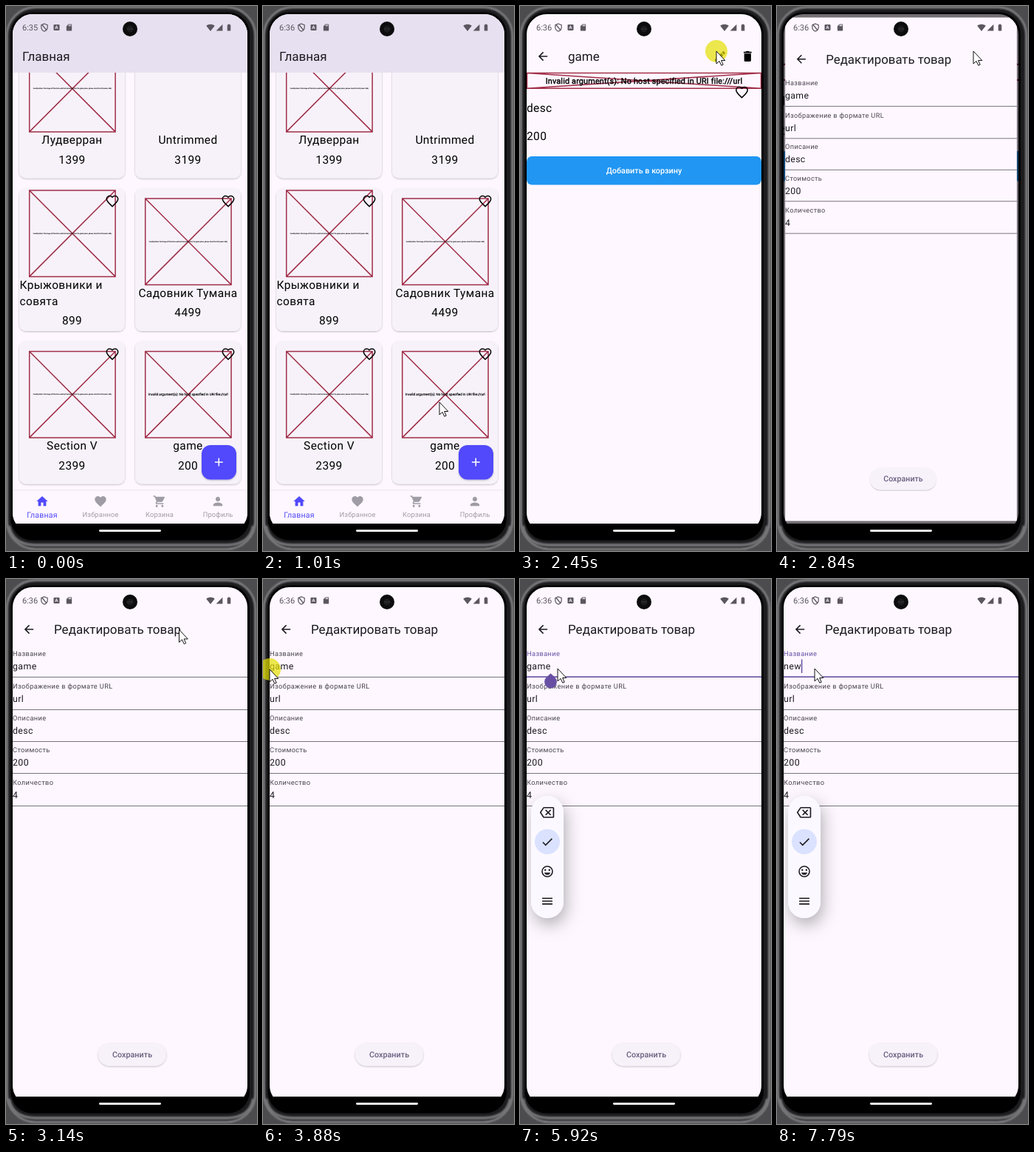
Animation, 340 px wide and 736 px high, one loop 8000 ms. Source, as an HTML page:

```html
<!DOCTYPE html>
<html lang="ru">
<head>
<meta charset="utf-8">
<title>Редактирование товара</title>
<style>
  html, body { margin: 0; width: 100%; height: 100%; overflow: hidden; background: #000; }
  svg { display: block; width: 100vw; height: 100vh; font-family: Roboto, sans-serif; text-rendering: geometricPrecision; }
</style>
</head>
<body>
<svg id="stage" viewBox="0 0 340 736"></svg>
<script>
const LOOP = 8000, STEP = 70;
const INK = '#1d1b20', PAGE = '#fef7ff', CARD = '#f7f2fa', ACCENT = '#6750a4';
const MUTED = '#a09ca5', BLUE = '#5149fb', STATUS = '#5b565f';

const ICON = {
  home: 'M10 20v-6h4v6h5v-8h3L12 3 2 12h3v8z',
  heart: 'M12 21.35l-1.45-1.32C5.4 15.36 2 12.28 2 8.5 2 5.42 4.42 3 7.5 3c1.74 0 3.41.81 4.5 2.09C13.09 3.81 14.76 3 16.5 3 19.58 3 22 5.42 22 8.5c0 3.78-3.4 6.86-8.55 11.54z',
  cart: 'M7 18c-1.1 0-2 .9-2 2s.9 2 2 2 2-.9 2-2-.9-2-2-2zM1 2v2h2l3.6 7.59-1.35 2.45C4.5 15.4 5.5 17 7 17h12v-2H7.42c-.14 0-.25-.11-.22-.37l.9-1.63h7.45c.75 0 1.41-.41 1.75-1.03l3.58-6.49A1 1 0 0 0 20 4H5.21l-.94-2zM17 18c-1.1 0-2 .9-2 2s.9 2 2 2 2-.9 2-2-.9-2-2-2z',
  person: 'M12 12c2.21 0 4-1.79 4-4s-1.79-4-4-4-4 1.79-4 4 1.79 4 4 4zm0 2c-2.67 0-8 1.34-8 4v2h16v-2c0-2.66-5.33-4-8-4z',
  edit: 'M3 17.25V21h3.75L17.81 9.94l-3.75-3.75zM20.71 7.04c.39-.39.39-1.02 0-1.41l-2.34-2.34c-.39-.39-1.02-.39-1.41 0l-1.83 1.83 3.75 3.75z',
  trash: 'M6 19c0 1.1.9 2 2 2h8c1.1 0 2-.9 2-2V7H6zM19 4h-3.5l-1-1h-5l-1 1H5v2h14z',
  back: 'M20 11H7.83l5.59-5.59L12 4l-8 8 8 8 1.41-1.41L7.83 13H20z',
  erase: 'M22 3H7c-.69 0-1.23.35-1.59.88L0 12l5.41 8.11c.36.53.9.89 1.59.89h15c1.1 0 2-.9 2-2V5c0-1.1-.9-2-2-2zm0 16H7.07L2.4 12l4.66-7H22zm-11.59-2L14 13.41 17.59 17 19 15.59 15.41 12 19 8.41 17.59 7 14 10.59 10.41 7 9 8.41 12.59 12 9 15.59z',
  check: 'M9 16.17L4.83 12l-1.42 1.41L9 19 21 7l-1.41-1.41z',
  menu: 'M3 18h18v-2H3zm0-5h18v-2H3zm0-7v2h18V6z',
  plus: 'M19 13h-6v6h-2v-6H5v-2h6V5h2v6h6z',
  sd: 'M18 2h-8L4 8v12c0 1.1.9 2 2 2h12c1.1 0 2-.9 2-2V4c0-1.1-.9-2-2-2zM12 8h-2V4h2zm3 0h-2V4h2zm3 0h-2V4h2z',
  battery: 'M15.67 4H14V2h-4v2H8.33C7.6 4 7 4.6 7 5.33v15.33C7 21.4 7.6 22 8.33 22h7.33c.74 0 1.34-.6 1.34-1.33V5.33C17 4.6 16.4 4 15.67 4z',
  signal: 'M2 22h20V2z',
  wifi: 'M0 7C7 1.6 17 1.6 24 7L12 22z'
};

// Drawing helpers; text is placed by the middle of its capitals.
const icon = (name, x, y, fill = INK, size = 18.5, extra = '') =>
  `<path d="${ICON[name]}" fill="${fill}" ${extra} transform="translate(${x - size / 2} ${y - size / 2}) scale(${size / 24})"/>`;
const rect = (x, y, w, h, fill, r = 0, extra = '') =>
  `<rect x="${x}" y="${y}" width="${w}" height="${h}" rx="${r}" fill="${fill}" ${extra}/>`;
const text = (s, x, y, size, { fill = INK, mid = false, gap = 0, extra = '' } = {}) =>
  `<text x="${x}" y="${y + size * 0.355}" font-size="${size}" fill="${fill}" letter-spacing="${gap}" ${mid ? 'text-anchor="middle"' : ''} ${extra}>${s}</text>`;
const body = (s, x, y, mid) => text(s, x, y, 15.46, { fill: '#000', mid, gap: 0.387 });
const title = (s, x) => text(s, x, 68, 17);
const heart = (x, y) => icon('heart', x, y, 'none', 18.5, 'stroke="#000" stroke-width="2"');

const HOST_ERROR = 'Invalid argument(s): No host specified in URI file:///url';
const LOAD_ERROR = 'Invalid picture: the image of this item could not be loaded from the given place, please check the link (code: 404)';

const missing = (x, y, w, h, message, size, gap = 0) =>
  `<path d="M${x} ${y}h${w}v${h}h${-w}zl${w} ${h}M${x + w} ${y}l${-w} ${h}" fill="none" stroke="#8d021f" stroke-opacity=".81" stroke-width="1.5"/>` +
  text(message, x + w / 2, y + h / 2, size, { fill: '#000', mid: true, gap, extra: `stroke="#000" stroke-width="${size * 0.035}"` });

function card(x, y, lines, price, top, opt = {}) {
  const cx = x + 71.5, wrap = lines.length > 1;
  let out = rect(x, y, 143, 192.5, CARD, 9, 'filter="url(#soft)"');
  if (!opt.bare) out += missing(x + 13.7, top, 116.4, 116.4, opt.message || LOAD_ERROR, opt.size || 2.15);
  lines.forEach((s, i) => out += body(s, wrap ? x + 0.5 : cx, top + 127.5 + i * 22, !wrap));
  out += body(price, cx, top + 127.5 + (wrap ? 48.5 : 26.4), true);
  return out + (y > 90 ? heart(x + 126, y + 17) : '');
}

function navItem(x, name, label, active) {
  const fill = active ? BLUE : MUTED;
  return icon(name, x, 669, fill) + text(label, x, 687, active ? 10.6 : 9.3, { fill, mid: true, gap: active ? 0.2 : 0.15 });
}

const home = rect(9, 11, 318, 689, PAGE) +
  card(18, 40, ['Лудверран'], '1399', 53.5) +
  card(175, 40, ['Untrimmed'], '3199', 53.5, { bare: true }) +
  card(18, 246.5, ['Крыжовники и', 'совята'], '899', 249) +
  card(175, 246.5, ['Садовник Тумана'], '4499', 260) +
  card(18, 453, ['Section V'], '2399', 466.5) +
  card(175, 453, ['game'], '200', 466.5, { message: HOST_ERROR, size: 4.55 }) +
  rect(9, 11, 318, 79, '#e7e0f0') + title('Главная', 22) +
  rect(265, 593, 47, 46.5, BLUE, 12, 'filter="url(#soft)"') + icon('plus', 288.3, 616, '#fff') +
  rect(9, 654, 318, 46, PAGE) + rect(9, 653.5, 318, 0.8, '#e6dfe8') +
  navItem(49, 'home', 'Главная', true) + navItem(128, 'heart', 'Избранное') +
  navItem(208, 'cart', 'Корзина') + navItem(287, 'person', 'Профиль');

const detail = rect(9, 11, 318, 689, PAGE) + icon('back', 31, 68) + title('game', 65) +
  icon('edit', 271, 68, '#000') + icon('trash', 308.3, 68, '#000') +
  missing(9.5, 90.5, 317, 20.8, HOST_ERROR, 10.82, 0.17) + heart(300.5, 116.5) +
  body('desc', 9, 138) + body('200', 9, 176) +
  rect(9, 203, 318, 38.5, '#2196f3', 7) +
  text('Добавить в корзину', 168, 222, 10.82, { fill: '#fff', mid: true, extra: 'font-weight="500"' });

const FIELDS = [['Название', 'game'], ['Изображение в формате URL', 'url'], ['Описание', 'desc'], ['Стоимость', '200'], ['Количество', '4']];
const field = ([label, value], i) => {
  const y = Math.round(43.4 * i + 0.2);
  return text(label, 9, 100.8 + y, 9.28, { fill: '#49454f', gap: 0.37, extra: `id="label${i}"` }) +
    text(value, 9, 117.8 + y, 12.37, { gap: 0.387, extra: `id="value${i}"` }) +
    rect(9, 132 + y, 318, 1, '#79747e', 0, `id="line${i}"`);
};
const form = rect(9, 11, 318, 689, PAGE) + icon('back', 31, 68) + title('Редактировать товар', 65) +
  FIELDS.map(field).join('') +
  rect(125, 627, 92, 30.5, CARD, 15.2, 'filter="url(#soft)"') +
  text('Сохранить', 171, 642.3, 10.82, { fill: '#6a5f80', mid: true, extra: 'font-weight="500"' }) +
  `<rect id="caret" y="108.5" width="1.5" height="18.5" fill="${ACCENT}"/>` +
  `<path id="handle" d="M41.5 127.5l6 5.6a8.4 8.4 0 1 1-12 0z" fill="${ACCENT}"/>`;

const pad = rect(15, 293, 44, 165, '#fbf9ff', 22, 'filter="url(#deep)"') +
  '<circle cx="37" cy="354.7" r="17" fill="#dae2ff"/>' +
  icon('erase', 36.5, 315.3, INK, 19.5) + icon('check', 37, 355) + icon('menu', 37, 435) +
  `<g fill="${INK}"><circle cx="37" cy="395" r="7" fill="none" stroke="${INK}" stroke-width="1.6"/>
   <circle cx="34.2" cy="393" r="1.2"/><circle cx="39.8" cy="393" r="1.2"/><path d="M32.8 396.5h8.4a4.4 4.4 0 0 1-8.4 0z"/></g>`;

const status = text('6:35', 22, 29, 11, { fill: STATUS, extra: 'id="clock"' }) +
  `<path d="M52 24l4.2 1.6v3.2q0 3.8-4.2 5.4q-4.2-1.6-4.2-5.4v-3.2zM48.6 25l6.6 8" fill="none" stroke="${STATUS}" stroke-width="1.2"/>` +
  rect(64.5, 25, 8, 8, STATUS, 1) + text('A', 68.5, 29, 6.5, { fill: '#eee8f3', mid: true, extra: 'font-weight="700"' }) +
  icon('sd', 85.5, 29, STATUS, 11) + icon('wifi', 277, 29.2, STATUS, 11.5) +
  icon('signal', 289, 29, STATUS, 10.5) + icon('battery', 302, 29, STATUS, 11) +
  '<circle cx="168" cy="31" r="10" fill="#0c0c0d"/><circle cx="168" cy="31" r="4.5" fill="#1b1b1d"/>' +
  '<path d="M164.5 31h7" stroke="#4a4a4c" stroke-dasharray="1.4 1.4"/>';

const shell = rect(0, 0, 340, 736, '#4c4c4e') +
  rect(1.5, 2, 336, 731, '#1c1c1e', 38) +
  rect(1.5, 2, 336, 731, 'none', 38, 'stroke="#8a8a8d" stroke-width="2.5" filter="url(#blur)"') +
  '<path d="M4 702q4 25 35 26h261q31-1 35-26" fill="none" stroke="#77777a" stroke-width="4" filter="url(#blur)"/>' +
  rect(6.5, 8.5, 323.5, 713, '#000', 29);

document.getElementById('stage').innerHTML = `
  <defs>
    <filter id="soft" x="-10%" y="-10%" width="120%" height="130%"><feDropShadow dx="0" dy=".9" stdDeviation=".8" flood-opacity=".28"/></filter>
    <filter id="deep" x="-120%" y="-30%" width="340%" height="170%"><feDropShadow dx="3" dy="9" stdDeviation="11" flood-opacity=".3"/></filter>
    <filter id="blur"><feGaussianBlur stdDeviation="1.1"/></filter>
    <clipPath id="screen"><path d="M9 38a27 27 0 0 1 27-27h264a27 27 0 0 1 27 27v646a27 27 0 0 1-4.5 15h-309a27 27 0 0 1-4.5-15z"/></clipPath>
  </defs>
  ${shell}
  <g clip-path="url(#screen)">
    <g id="home">${home}</g><g id="detail">${detail}</g><g id="form">${form}</g>
    ${status}
  </g>
  ${rect(126, 707.2, 84, 2.8, '#fff', 1.4)}
  <g id="pad" clip-path="url(#screen)">${pad}</g>
  <circle id="tap" r="15" fill="#e4e000" fill-opacity=".7"/>
  <path id="pointer" d="M0 0V17L4 13.4 6.8 19.3 9.2 18.2 6.6 12.5H11.8Z" fill="#fff" stroke="#111" stroke-width="1"/>`;

const el = id => document.getElementById(id);
const clamp = x => Math.max(0, Math.min(1, x));
const part = (x, a, b) => clamp((x - a) / (b - a));
const bez = (s, a, b, c, d) => (1 - s) ** 3 * a + 3 * (1 - s) ** 2 * s * b + 3 * (1 - s) * s * s * c + s ** 3 * d;
const show = (id, on) => el(id).setAttribute('display', on ? 'inline' : 'none');
const set = (id, attrs) => { for (const k in attrs) el(id).setAttribute(k, attrs[k]); };

// Emphasized easing: two cubic pieces joined at (1/6, 0.4).
function emphasized(x) {
  const first = x < 1 / 6;
  const xs = first ? [0, 0.05, 0.1333, 1 / 6] : [1 / 6, 0.2083, 0.25, 1];
  const ys = first ? [0, 0, 0.06, 0.4] : [0.4, 0.82, 1, 1];
  let lo = 0, hi = 1;
  for (let i = 0; i < 24; i++) {
    const m = (lo + hi) / 2;
    if (bez(m, ...xs) < x) lo = m; else hi = m;
  }
  return bez(lo, ...ys);
}

// Pointer moves: start, end, then points along the way.
const MOVES = [
  [200, 550, [316, 691], [239, 535]],
  [1490, 1980, [239, 535], [268, 28]],
  [1980, 2120, [268, 28], [266, 61]],
  [2980, 3620, [266, 61], [9, 122]],
  [3950, 4020, [9, 122], [15, 121]],
  [4140, 4280, [15, 121], [29, 121]],
  [5020, 5300, [29, 121], [51, 121]]
];
const TAPS = [[950, 1010], [2450, 2590], [3690, 3950], [4560, 4700], [5370, 5510]];
const TYPED = [[0, 'game'], [6050, 'gam'], [6120, 'ga'], [6190, 'g'], [6250, ''], [7320, 'n'], [7720, 'ne'], [7790, 'new']];
const CARET = [[4700, 5090], [5370, 5920], [6050, 6860], [7320, LOOP]];
const within = (list, t) => list.some(([a, b]) => t >= a && t < b);
const last = (list, t) => list.filter(item => item[0] <= t).pop();

function pointerAt(t) {
  const move = last(MOVES, t);
  if (!move) return null;
  const [a, b, from, to] = move;
  const held = a + Math.floor((t - a) / STEP + 0.001) * STEP;
  const p = t >= b ? 1 : part(held, a, b), e = p * p * (3 - 2 * p);
  return from.map((v, i) => v + (to[i] - v) * e);
}

const zoom = (id, k) => set(id, { transform: `translate(168 355.5) scale(${k}) translate(-168 -355.5)` });

function transition(from, to, x) {
  const e = emphasized(x), shade = 1 - 0.6 * part(x, 0.2075, 0.4175);
  zoom(from, 1 + 0.05 * e);
  zoom(to, 0.85 + 0.15 * e);
  set(from, { opacity: shade });
  set(to, { opacity: part(x, 0.125, 0.25) });
  show(from, x < 1);
  show(to, x > 0);
}

function render(t) {
  const open = t < 1150 ? 0 : t >= 1360 ? 1 : (60 + Math.floor((t - 1150) / STEP) * STEP) / 350;
  const edit = t < 2700 ? 0 : t < 2840 ? 0.02 : clamp((140 + Math.floor((t - 2840) / STEP) * STEP) / 350);
  if (open < 1) {
    transition('home', 'detail', open);
    show('form', false);
  } else {
    show('home', false);
    transition('detail', 'form', edit);
  }

  el('clock').textContent = t < 690 ? '6:35' : '6:36';
  const focus = t >= 4700, value = el('value0');
  set('label0', { fill: focus ? ACCENT : '#49454f' });
  set('line0', { fill: focus ? ACCENT : '#79747e', height: focus ? 1.6 : 1, y: focus ? 131.4 : 132 });
  value.textContent = last(TYPED, t)[1];
  show('caret', within(CARET, t));
  if (focus) set('caret', { x: 9 + (value.textContent ? value.getComputedTextLength() : 0) });
  show('handle', t >= 4770 && t < 6050);
  show('pad', t >= 5160);
  set('pad', { opacity: part(t, 5090, 5230) });

  const pos = pointerAt(t);
  show('pointer', !!pos);
  show('tap', within(TAPS, t));
  if (pos) {
    set('pointer', { transform: `translate(${pos})` });
    set('tap', { cx: pos[0], cy: pos[1] });
  }
}

const begin = performance.now();
function tick() {
  render((performance.now() - begin) % LOOP);
  requestAnimationFrame(tick);
}
tick();
</script>
</body>
</html>
```
